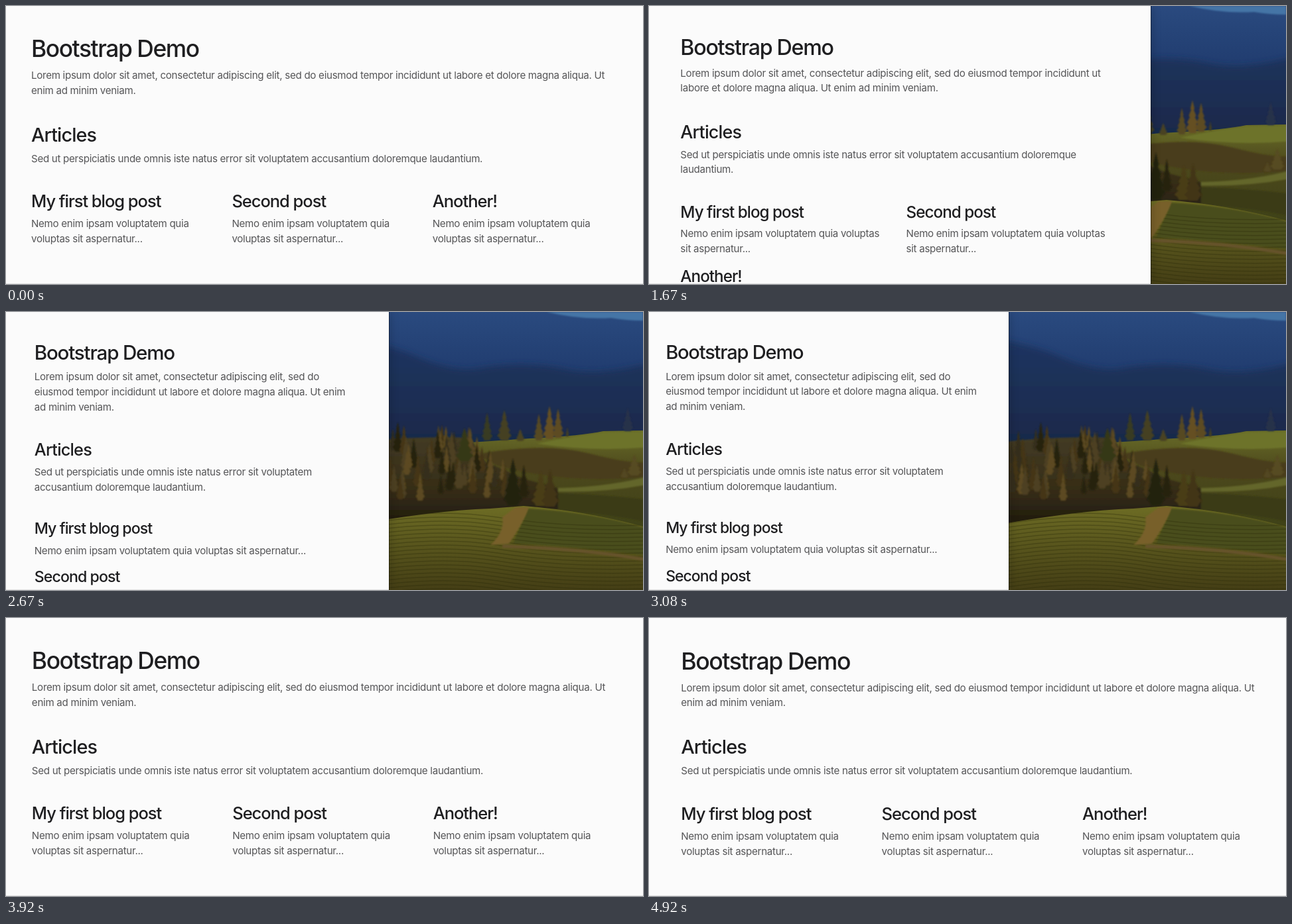
Write an HTML page that moves like this. It is 960x420 px and loops after 5 s.

```html
<!DOCTYPE html>
<html lang="en">
<head>
<meta charset="utf-8">
<title>Responsive page demo</title>
<style>
  html { font-size: 15.12px; }
  html, body { margin: 0; width: 100%; height: 100%; overflow: hidden; }
  body {
    position: relative;
    background: #1b2f57;
    font: 400 1rem/1.5 Inter, Roboto, sans-serif;
    font-optical-sizing: none;
    letter-spacing: -.019em;
    color: #555557;
  }
  #photo { position: absolute; left: 0; top: 0; width: 960px; height: 420px; }
  #window {
    position: absolute; left: -4.7px; top: 0; height: 419px;
    overflow: hidden;
    background: #fbfbfb;
    border-bottom: 1px solid #e2e2e2;
    box-shadow: 0 0 0 1px rgba(0, 0, 0, .4), 0 0 14px rgba(0, 0, 0, .25);
  }
  #page { position: absolute; left: 0; top: 44.4px; width: var(--w); white-space: nowrap; }
  .container { margin: 0 auto; }
  header, section, .col { padding: 0 .75rem; box-sizing: border-box; }
  header, section { margin-bottom: 2.5rem; }
  .row { display: flex; flex-wrap: wrap; }
  h1, h2, h3 { margin: 0 0 .5rem; font-weight: 500; line-height: 1.2; color: #1e1e20; }
  h1 { font-size: calc(1.375rem + var(--w) * .015); letter-spacing: -.04em; }
  h2 { font-size: calc(1.325rem + var(--w) * .009); letter-spacing: -.031em; }
  h3 { font-size: calc(1.3rem + var(--w) * .006); letter-spacing: -.04em; }
  p { margin: 0; }
  .col p { margin-bottom: 1rem; }

  /* layout per breakpoint */
  br { display: none; }
  .sm .container { width: 33.75rem; }
  .md .container { width: 45rem; }
  .lg .container { width: 60rem; }
  .sm .col { width: 100%; }
  .md .col { width: 50%; }
  .lg .col { width: 33.3333%; }
  .sm br.on-sm, .md br.on-md, .lg br.on-lg { display: inline; }
</style>
</head>
<body>
<svg id="photo" viewBox="0 0 960 420">
  <defs>
    <linearGradient id="far" x2="0" y2="1">
      <stop offset="0" stop-color="#2a4a7f"/>
      <stop offset=".4" stop-color="#213d70"/>
      <stop offset="1" stop-color="#18284d"/>
    </linearGradient>
    <linearGradient id="near" x2="0" y2="1">
      <stop offset="0" stop-color="#1d3562"/>
      <stop offset="1" stop-color="#182643"/>
    </linearGradient>
    <linearGradient id="field" x2="0" y2="1">
      <stop offset="0" stop-color="#696c28"/>
      <stop offset=".25" stop-color="#4c481c"/>
      <stop offset=".6" stop-color="#3f4218"/>
      <stop offset="1" stop-color="#4a4a18"/>
    </linearGradient>
    <linearGradient id="front" x2="0" y2="1">
      <stop offset="0" stop-color="#6d6c24"/>
      <stop offset=".45" stop-color="#59561d"/>
      <stop offset="1" stop-color="#443e15"/>
    </linearGradient>
    <linearGradient id="wood" x2="0" y2="1">
      <stop offset="0" stop-color="#433b25"/>
      <stop offset=".55" stop-color="#352c16"/>
      <stop offset="1" stop-color="#16140b"/>
    </linearGradient>
    <clipPath id="frontClip"><path d="M500 326Q640 300 730 297L780 293Q870 300 960 324V420H500Z"/></clipPath>
    <filter id="soft"><feGaussianBlur stdDeviation="1.2"/></filter>
    <filter id="haze"><feGaussianBlur stdDeviation="5"/></filter>
  </defs>
  <rect width="960" height="215" fill="url(#far)"/>
  <path d="M815 0H960V13Q935 13 912 9Q865 12 815 0Z" fill="#4475a6" filter="url(#soft)"/>
  <path d="M480 35Q570 45 620 68Q680 94 720 84Q790 74 850 88Q900 98 990 72V240H480Z" fill="url(#near)" filter="url(#haze)"/>
  <path d="M700 197L790 191Q870 187 900 180L960 179V420H700Z" fill="url(#field)"/>
  <g filter="url(#soft)">
    <path d="M800 199Q850 188 900 182L970 181V204Q890 212 800 199Z" fill="#6d7329"/>
    <path d="M710 215Q810 196 880 214T970 226V248Q850 262 740 232Z" fill="#483e1a"/>
    <path d="M820 266Q900 266 970 248V260Q900 274 820 271Z" fill="#63662a"/>
    <path d="M740 274Q850 270 970 284V318Q860 295 740 300Z" fill="#3a3b14"/>
    <path d="M480 205Q580 186 700 190L722 226L780 252L832 266V298L740 298Q640 302 480 340Z" fill="url(#wood)"/>
  </g>
  <g id="trees" filter="url(#soft)"></g>
  <path d="M500 326Q640 300 730 297L780 293Q870 300 960 324V420H500Z" fill="url(#front)"/>
  <path d="M786 297Q880 302 970 328V368Q850 354 764 350Z" fill="#4a4d1a" filter="url(#soft)"/>
  <g id="rows" clip-path="url(#frontClip)" fill="none" stroke="#282708" stroke-opacity=".32" stroke-width="1.5"></g>
  <g filter="url(#soft)">
    <path d="M748 354Q860 356 970 375" fill="none" stroke="#66532a" stroke-width="5"/>
    <path d="M768 295H788Q780 318 758 350L730 352Q752 332 748 310Z" fill="#78612b"/>
  </g>
</svg>

<div id="window">
  <div id="page">
    <div class="container">
      <header>
        <h1>Bootstrap Demo</h1>
        <p>Lorem ipsum dolor sit amet, consectetur adipiscing elit, sed do <br class="on-sm">eiusmod tempor incididunt ut <br class="on-md">labore et dolore magna aliqua. Ut <br class="on-lg">enim <br class="on-sm">ad minim veniam.</p>
      </header>
      <section>
        <h2>Articles</h2>
        <p>Sed ut perspiciatis unde omnis iste natus error sit voluptatem <br class="on-sm">accusantium doloremque <br class="on-md">laudantium.</p>
      </section>
      <div class="row" id="posts"></div>
    </div>
  </div>
</div>

<script>
const $ = id => document.getElementById(id);

$('posts').innerHTML = ['My first blog post', 'Second post', 'Another!'].map(title => `
  <div class="col">
    <h3>${title}</h3>
    <p>Nemo enim ipsam voluptatem quia <br class="on-lg">voluptas <br class="on-md">sit aspernatur...</p>
  </div>`).join('');

// Scenery details
let seed = 7;
const random = () => (seed = seed * 16807 % 2147483647) / 2147483647;
const tree = (x, base, height, color, spread = .2) => {
  const half = height * spread;
  const tiers = [.3, .55, .8, 1];
  const side = sign => tiers.map(t =>
    `${x + sign * half * t} ${base - height * (1 - t * .85)} ${x + sign * half * t * .7} ${base - height * (.95 - t * .85)}`);
  return `<path d="M${x} ${base - height}L${side(1).join(' ')} ${x + half * .5} ${base} ${x - half * .5} ${base} `
    + `${side(-1).reverse().map(p => p.split(' ')).map(([a, b, c, d]) => `${c} ${d} ${a} ${b}`).join(' ')}Z" fill="${color}"/>`;
};
const woodColors = ['#4e4122', '#342e1a', '#443619', '#25230f', '#5c4a20'];
let trees = '';
for (let i = 0; i < 80; i++) {
  const depth = i / 80;
  const x = 535 + random() * (165 + depth * 90);
  const base = 208 + depth * 78 + Math.max(0, x - 690) * .12 * (1 - depth);
  trees += tree(x, base, 28 + random() * 22, woodColors[i % 5], .17);
}
trees += tree(725, 194, 42, '#373a22') + tree(751, 194, 46, '#454022', .24) + tree(775, 195, 18, '#4a4322', .4)
  + tree(803, 194, 40, '#574822') + tree(819, 192, 50, '#654f24') + tree(832, 190, 44, '#5d4b23')
  + tree(846, 188, 14, '#423d22') + tree(937, 180, 35, '#283148', .25)
  + tree(691, 225, 50, '#363715', .28) + tree(764, 293, 72, '#20230f')
  + tree(806, 293, 52, '#4a3d18', .28) + tree(820, 294, 56, '#423615', .24)
  + tree(947, 247, 32, '#574b20', .35) + tree(932, 250, 14, '#524720', .5);
$('trees').innerHTML = trees;

let rows = '';
for (let i = 0; i < 22; i++) {
  const y = 306 + i * 6;
  rows += `<path d="M500 ${y + 14}Q640 ${y - 12} 740 ${y + 4}T960 ${y + 16}"/>`;
}
$('rows').innerHTML = rows;

// Right edge of the window: [ms, px]
const drag = [
  [1250, 965.2], [1333, 922], [1500, 832], [1667, 757], [1750, 741], [1833, 718],
  [2333, 633.2], [2417, 616.4], [2750, 565], [3000, 544.4], [3083, 542.5],
  [3250, 590], [3417, 695], [3583, 838], [3667, 890], [3750, 937], [3917, 967],
  [4167, 993], [4333, 1007], [4500, 1015], [4583, 1015], [4667, 1012],
  [4750, 1007], [4833, 997], [4917, 985.6]
];
function edgeAt(ms) {
  const next = drag.findIndex(key => key[0] >= ms);
  if (next === 0) return drag[0][1];
  if (next < 0) return drag[drag.length - 1][1];
  const [t0, x0] = drag[next - 1], [t1, x1] = drag[next];
  return x0 + (x1 - x0) * (ms - t0) / (t1 - t0);
}

const REM = 15.12, OFFSCREEN = 4.7, LAG = 14;
let shown = -1;
function draw() {
  // Twelve poses per second, on a 10 ms clock
  const step = Math.floor((Math.floor(performance.now() % 5000 / 10) + .5) * .12);
  if (step !== shown) {
    shown = step;
    const ms = step * 1000 / 12;
    const right = edgeAt(ms);
    const width = right + OFFSCREEN;
    // While growing, the frame trails its content
    $('window').style.width = Math.min(right, edgeAt(ms - LAG)) + OFFSCREEN - .7 + 'px';
    $('page').style.setProperty('--w', width + 'px');
    $('page').className = width >= 62 * REM ? 'lg' : width >= 48 * REM ? 'md' : 'sm';
  }
  requestAnimationFrame(draw);
}
draw();
</script>
</body>
</html>
```
